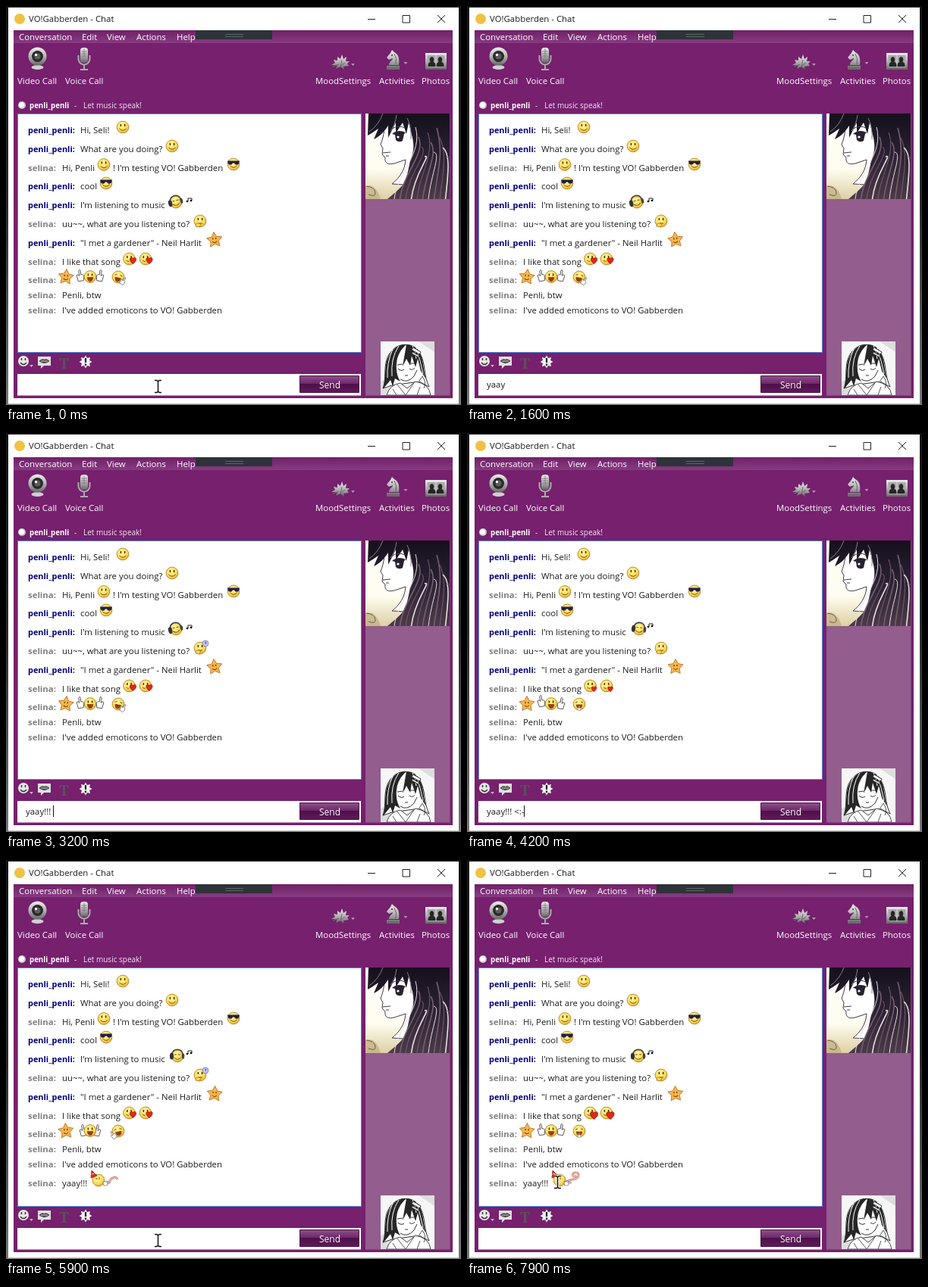
An HTML page for the animation above (8 s loop, 600 by 527 pixels).

```html
<!DOCTYPE html>
<html lang="en">
<head>
<meta charset="utf-8">
<title>Chat</title>
<style>
html, body { margin: 0; width: 100%; height: 100%; overflow: hidden; background: #333; }
svg { display: block; width: 600px; height: 527px; }
text { font: 11.4px "Open Sans", "Noto Sans", sans-serif; fill: #1c1c1c; white-space: pre; }
.w { fill: #fff; }
.s { font-size: 10px; fill: #f4e6f3; }
.name { font-size: 9.7px; font-weight: 700; fill: #fff; }
.me { font-weight: 700; fill: #808080; }
.pal { font-size: 10.9px; font-weight: 700; fill: #000080; }
.send { font-size: 12px; fill: #fff; }
.type { font: 700 20px "Noto Serif", serif; fill: #5b505c; }
</style>
</head>
<body>
<svg viewBox="0 0 600 527" xmlns="http://www.w3.org/2000/svg">
  <defs>
    <radialGradient id="skin" cx=".42" cy=".35" r=".7">
      <stop offset="0" stop-color="#fff8a8"/><stop offset=".6" stop-color="#fbdd5c"/><stop offset="1" stop-color="#e0a52c"/>
    </radialGradient>
    <linearGradient id="menu" x2="0" y2="1">
      <stop offset="0" stop-color="#702068"/><stop offset="1" stop-color="#873c81"/>
    </linearGradient>
    <linearGradient id="send" x2="0" y2="1">
      <stop offset="0" stop-color="#8d5189"/><stop offset=".48" stop-color="#6d2668"/>
      <stop offset=".5" stop-color="#4e0f4a"/><stop offset="1" stop-color="#611a5c"/>
    </linearGradient>
    <linearGradient id="metal" x2="0" y2="1">
      <stop offset="0" stop-color="#eee"/><stop offset=".5" stop-color="#b4b4b4"/><stop offset="1" stop-color="#666"/>
    </linearGradient>
    <linearGradient id="desk" x2="0" y2="1">
      <stop offset="0" stop-color="#151515"/><stop offset=".5" stop-color="#2c2a2c"/><stop offset="1" stop-color="#777"/>
    </linearGradient>
    <linearGradient id="paper" x2="0" y2="1">
      <stop offset="0" stop-color="#fffef8"/><stop offset=".65" stop-color="#fffdf0"/><stop offset="1" stop-color="#ddd0a4"/>
    </linearGradient>
    <linearGradient id="hair" x2="0" y2="1">
      <stop offset="0" stop-color="#15101c"/><stop offset=".5" stop-color="#2b2233"/><stop offset="1" stop-color="#4d3a48"/>
    </linearGradient>
    <clipPath id="pic1"><path d="M474 142h111v113h-111z"/></clipPath>
    <clipPath id="pic2"><path d="M494 443h71v71h-71z"/></clipPath>
  </defs>

  <!-- window -->
  <path fill="url(#desk)" d="M0 0h600v527H0z"/>
  <path fill="#fff" d="M3 2h594v523.500H3z"/>
  <path fill="#76206e" d="M10 32h579v486H10z"/>
  <path fill="url(#menu)" d="M10 32h579v17H10z"/>
  <circle cx="18" cy="17" r="7" fill="#f0c244"/>
  <path d="M477 17.500h10M523 12.500h9.500v9.500h-9.500zM569 12l10 10m0-10l-10 10" fill="none" stroke="#222"/>
  <path fill="#2d3338" d="M250 32h101v12H250z"/>
  <path d="M289 37.500h24M289 40.500h24" stroke="#5d666a"/>

  <!-- webcam -->
  <ellipse cx="41.500" cy="81" rx="8" ry="3" fill="#d0d0d0"/>
  <circle cx="41.500" cy="66.500" r="12" fill="url(#metal)"/>
  <circle cx="41.500" cy="66.500" r="7.500" fill="#2a2a2a"/><circle cx="41.500" cy="66.500" r="4" fill="#5c5c5c"/>
  <circle cx="39.500" cy="64.500" r="1.700" fill="#fff"/>
  <!-- microphone -->
  <path d="M95.500 65v5a7.500 7.500 0 0 0 15 0v-5M103 78v5m-5 1h10" fill="none" stroke="#aaa" stroke-width="2"/>
  <rect x="98" y="55" width="10" height="20" rx="4" fill="url(#metal)"/>
  <path d="M99 60h8m-8 3h8m-8 3h8M103 56v12" stroke="#777" stroke-width=".8"/>
  <!-- leaf, knight, photos -->
  <path fill="url(#metal)" d="M443 64l2 6 4-3-1 6 5 0-3 3 2 3-7 1 1 4-5-4-6 3 2-5-8 0 5-3-2-4 5 1 0-5 4 3z"/>
  <path d="M431 80l8-3M443 71l-2 10m6-6l-6 4" fill="none" stroke="#6b6b6b"/>
  <path fill="url(#metal)" d="M505 78c0-5 5-6 5-9l-5 2-3-3 5-6 2-4 3 3c6 3 7 9 6 17zM502 79h17v5h-17z"/>
  <path d="M512 63q4 6 2 14M503 81.500h15" fill="none" stroke="#666"/><circle cx="509" cy="65" r="1" fill="#333"/>
  <path fill="#c9c9c9" d="M455 76h5l-2.500 3zM524.500 74h5l-2.500 3z" opacity=".7"/>
  <path fill="url(#metal)" d="M553 62h28v22h-28z"/><path fill="#a9a9a9" d="M555.500 65h23v16h-23z"/><path d="M567 65v16" stroke="#ddd"/>
  <path fill="#262626" d="M556.500 80c0-5 1-5 3-6-4-9 8-9 4 0 2 1 3 1 3 6zm11 0c0-5 1-5 3-6-4-9 8-9 4 0 2 1 3 1 3 6z"/>

  <circle cx="21" cy="131" r="5" fill="#ccc"/><circle cx="20.500" cy="130.500" r="3.500" fill="#fff"/>

  <!-- panels -->
  <path fill="#fff" stroke="#4a86d8" d="M15.500 142.500h453v315h-453z"/>
  <path fill="#fff" d="M15 486h453v28.500H15z"/>
  <path fill="url(#send)" stroke="#4b1248" d="M387.500 488.500h78v22h-78z"/>
  <path fill="#935d8e" d="M474 142h111.500v372.500h-111.500z"/>

  <!-- portrait, dark hair -->
  <g clip-path="url(#pic1)">
    <path fill="url(#paper)" d="M474 142h111v113h-111z"/>
    <path fill="#b9a678" opacity=".6" d="M474 238q14-4 20 17h-20z"/>
    <path d="M475 238q11 1 12 8t-9 3" fill="none" stroke="#6d5d4a"/>
    <path fill="#fff" stroke="#42394a" d="M500 148c-1 14-1 22-6 35l3 5-1 8 4 4c-1 8 4 10 12 8l15-5c-1 14-8 24-18 32l34 2 16-60-30-40z"/>
    <path fill="url(#hair)" d="M478 142h107v113h-82c9-8 18-14 23-23 4-10 5-20 8-31 4-9 4-17 2-27l-5-20-3 15-5-15-9 14 0-14-10 20 0-16c-6 9-11 14-19 18l6-14c-6 4-10 7-14 9z"/>
    <path d="M497 142q-6 16-18 24m36-22q-2 14-8 21m22-17q6 12 5 28" fill="none" stroke="#887d8d"/>
    <g id="strands" fill="none"></g>
    <path fill="#2a2130" d="M509 169q8-7 18-2l-2 2-2 9q-5 3-9-1l-1-7z"/><circle cx="517" cy="173" r="1.600" fill="#fff"/>
    <path d="M509 162q9-5 17-1M497 194l10-1m-6 5h4" fill="none" stroke="#4a3a48"/>
  </g>
  <!-- portrait, grey sketch -->
  <g clip-path="url(#pic2)">
    <path fill="#f6f6f6" d="M494 443h71v71h-71z"/>
    <path fill="#ddd" d="M544 443h21v14zM494 496l14-6 10 24h-24z"/>
    <path fill="#fff" stroke="#333" d="M497 505c6-16-2-35 12-50 12-13 31-8 37 4 8 14 4 28 12 44l-13-7-36 5z"/>
    <path fill="#262626" d="M497 506c6-18-1-35 12-50 5-6 12-9 19-9-8 7-12 15-13 25-1 10 1 17 5 24l-7-4-3 10-3-8z"/>
    <path fill="#262626" d="M528 447c8 0 14 4 18 12 5 10 4 22 8 34l-7-11-4-16-3 11-5-15-2 13-5-9-5 10z"/>
    <path d="M510 453q-8 18-7 38m15-42q-11 16-9 40m32-37q6 18 9 34m-14-37q4 8 5 17" fill="none" stroke="#fff"/>
    <path fill="#fff" stroke="#333" d="M537 451l10 6-2 3-10-6zM536 457l9 5-1 2-9-5z"/>
    <path d="M517 479q4 4 8 1m7-1q4 3 7-1M516 474l7-1m10-1l6 0M526 488h4M520 493q9 6 18-4l4-8" fill="none" stroke="#333"/>
    <path fill="#fff" stroke="#444" d="M502 514q4-14 18-16l9 7 11-9q18 3 20 18z"/>
    <path d="M516 500l11 14 11-16m-28 8l5 8m31-11l-4 11m9-9q4-8-2-16l-4 6" fill="none" stroke="#555"/>
  </g>

  <!-- input tools -->
  <circle cx="23" cy="469" r="7" fill="#e6e6e6"/>
  <path d="M19 471q4 5 8 0M20.500 465v3m5-3v3" fill="none" stroke="#333" stroke-width="1.500"/>
  <path fill="#bbb" d="M31 474h5l-2.500 3z"/>
  <path fill="#e0e0e0" d="M42 463h17v12h-9l-4 4v-4h-4z"/>
  <path fill="#444" d="M43.500 469q4-4 7-2 3-2 7 2-7 6-14 0z"/><path d="M46 469h9" stroke="#ddd"/>
  <text x="70" y="478.500" class="type">T</text>
  <path id="burst" fill="#f2f2f2"/>
  <path d="M105 465v6m0 1.500v2.500" stroke="#222" stroke-width="2.200"/>

  <g id="words"></g>
  <g id="live"></g>
  <text id="draft" x="26" y="504"></text>
  <path id="caret" stroke="#111" fill="none"/>
  <g id="beam" fill="none">
    <path d="M-4.500-8h3l1.500 1.500 1.500-1.500h3M0-6.500v13M-4.500 8h3l1.500-1.500 1.500 1.500h3" stroke="#fff" stroke-width="3.500"/>
    <path d="M-4.500-8h3l1.500 1.500 1.500-1.500h3M0-6.500v13M-4.500 8h3l1.500-1.500 1.500 1.500h3" stroke="#111" stroke-width="1.500"/>
  </g>
</svg>
<script>
const LOOP = 8000, STEP = 100;
const $ = id => document.getElementById(id);
const label = (x, y, s, c = '') => `<text x="${x}" y="${y}" class="${c}">${s}</text>`;
const line = (d, c = '#7a4a10', w = 1) => `<path d="${d}" fill="none" stroke="${c}" stroke-width="${w}"/>`;
const shape = (d, c, edge = 'none') => `<path d="${d}" fill="${c}" stroke="${edge}" stroke-width=".8"/>`;
const at = (x, y, s, turn = 0, kx = 1, ky = Math.abs(kx)) =>
  `<g transform="translate(${x} ${y}) rotate(${turn}) scale(${kx} ${ky})">${s}</g>`;

function spikes(n, outer, inner, cx = 0, cy = 0) {
  const pts = Array.from({ length: 2 * n }, (_, i) => {
    const r = i % 2 ? inner : outer, a = Math.PI * (i / n - .5);
    return (cx + r * Math.cos(a)).toFixed(1) + ' ' + (cy + r * Math.sin(a)).toFixed(1);
  });
  return 'M' + pts.join('L') + 'z';
}

// Fixed text
const YOU = 'penli_penli', ME = 'selina';
const chat = [
  [1, 168, 'Hi, Seli!'], [1, 193, 'What are you doing?'], [0, 218, 'Hi, Penli'],
  [1, 242, 'cool'], [1, 267, "I'm listening to music"],
  [0, 292, 'uu~~, what are you listening to?'], [1, 317, '"I met a gardener" - Neil Harlit'],
  [0, 342, 'I like that song'], [0, 366, ''], [0, 386, 'Penli, btw'],
  [0, 406, "I've added emoticons to VO! Gabberden"]
];
const say = ([pal, y, s]) =>
  label(29, y, (pal ? YOU : ME) + ':', pal ? 'pal' : 'me') + label(pal ? 98 : 74, y, s);
const menus = [[17, 'Conversation'], [100, 'Edit'], [133, 'View'], [172, 'Actions'], [225, 'Help']];
const tools = [[15, 'Video Call'], [78, 'Voice Call'], [408, 'MoodSettings'], [492, 'Activities'], [548, 'Photos']];
$('words').innerHTML = label(30, 21, 'VO!Gabberden - Chat') +
  menus.map(([x, s]) => label(x, 45, s, 'w')).join('') +
  tools.map(([x, s]) => label(x, 102.5, s, 'w')).join('') +
  label(31, 134.5, YOU, 'name') + label(90, 134.5, '-', 's') + label(102, 134.5, 'Let music speak!', 's') +
  label(413, 504.5, 'Send', 'send') + chat.map(say).join('') +
  label(141, 218, "! I'm testing VO! Gabberden");
$('burst').setAttribute('d', spikes(8, 8.5, 5.5, 105, 470));
$('strands').innerHTML = Array.from({ length: 11 }, (_, i) => {
  const x = 540 + i * 4, end = 512 + i * 7.5;
  return line(`M${x} ${160 + i * 13 % 45}C${x + 10} 195 ${end + 4} 220 ${end} 255`, i % 3 ? '#75606f' : '#e9dfe2', 1 + i % 2 * .6);
}).join('');

// Emoticons
const eyes = line('M-2.600-4v3M2.600-4v3', '#4a2a05', 1.5);
const smile = line('M-4.500 2q4.500 4.500 9 0');
const laugh = shape('M-3.800 1h7.600q-.8 5-3.800 5t-3.800-5z', '#9c3a1a', '#7a4a10');
const ball = s => `<circle r="7.900" fill="url(#skin)" stroke="#b07a1c" stroke-width=".8"/>` + s;
const happy = ball(eyes + smile);
const cool = ball(smile + shape('M-8-4.500h16l-1 4q-4 3-6-1h-2q-2 4-6 1z', '#20204a'));
const star = shape(spikes(5, 10.5, 5.5), '#f7b84c', '#b5651a') +
  at(0, 0, eyes, 0, .75) + line('M-3 2q3 3 6 0', '#7a3a08');
const glove = shape('M-3 5l-1-7q2-2 3 1l0-6q2-2 2 0l0 5q3-1 3 3l-1 4z', '#fff', '#555');
const heart = shape('M0 5C-8-1-4-6 0-3 4-6 8-1 0 5z', '#e02818', '#99150c');

function tongue(ms) {
  const p = ms % 2700;
  if (p < 2000 || p >= 2400) return happy;
  const r = p >= 2100 && p < 2300 ? 3.8 : 2.2;
  return ball(eyes + `<circle cy="2.500" r="${r}" fill="#df3020" stroke="#8c1d10" stroke-width=".6"/>`);
}

function music(i) {
  const dx = [-2, -1, 1, 0, 2, 1, 0, 0][i], tilt = [-14, -8, 6, 0, 14, 8, 0, 0][i];
  const phones = line('M-7-2c0-9 14-9 14 0', '#444', 1.6) +
    '<ellipse cx="-7.500" cy="0" rx="2.600" ry="4.500" fill="#333"/><ellipse cx="7.500" cy="0" rx="1.800" ry="3.800" fill="#444"/>';
  const ny = [257, 256, 255, 255, 255, 255, 254, 255][i];
  return at(226 + dx, 259, ball(line('M-4-2h3m2 0h3') + smile + phones), tilt) +
    at(242, ny, line('M-2 1v-4h5v3', '#222') + '<circle cx="-3" cy="1" r="1.300"/><circle cx="2" cy="0" r="1.300"/>');
}

function think(ms) {
  const idea = ms % 2900 >= 100 && ms % 2900 < 500;
  return ball(eyes + line('M-2 3h5') + shape('M-6 7q0-5 4-4l3 1-2 4z', '#f8d860', '#a86c12')) +
    (idea ? '<circle cx="7" cy="-6" r="4" fill="#c9c6f2" stroke="#6a67b8" stroke-width=".7"/>' + line('M6-7q2-2 2 0l-1 2', '#4744a0', .9) : '');
}

function love(i) {
  const y = [2, 3, 4, 2, 5, 5, 4, 3][i], k = [.9, .8, .75, .9, .7, .75, .85, 1.1][i];
  return ball(eyes + line('M-4 2q2 2 4 1') + at(5, y, heart, 0, k));
}

function cheer(i) {
  const pose = [0, 0, 1, 2, 1, 0, 0, 0][i];
  const [gap, left, right] = [[13, 0, 0], [13, -2, 1], [9, 1, 1]][pose];
  return at(-gap, left, glove, -8, 1.15) + at(gap, right, glove, 8, -1.15) + ball(eyes + laugh);
}

function giggle(i) {
  const side = [1, 1, 0, -1, -1, -1, -1, 0][i];
  return at(148 - (i === 4 ? 3 : 0), 358, ball(line('M-5-2l3-1m4 0l3 1') + laugh), side * 12) +
    at(148 + side * 6, 364, glove, side * 35, side ? .8 : .5);
}

function party(i) {
  const out = i > 1 && i < 6;
  const horn = out ? 'M6 3q7 3 10-4 7-6 9 0' : 'M6 3l10-4c13-1 10-11 4-9-5 2-2 7 2 4';
  return ball(line('M-4-2h3m2-2v3')) +
    at(-6, -7, shape('M-4 4L-3-6 4 1z', '#dd2f2b', '#8f1c1c') + line('M-3.500-1l4-1', '#ffe060')) +
    line(horn, '#b9564c', 2.6) + line(horn, '#f8d8cc', 1.2) +
    at(10, 4, glove, 80, .75);
}

function drawLive(ms) {
  const i = ms / STEP % 8;
  const sway = [-6, -3, 0, 4, 6, 4, 0, -3][i];
  const kiss = love(i);
  let s = at(154, 160, happy) + at(219, 185, tongue(ms)) + at(129, 209.5, tongue(ms)) +
    at(300, 209, cool) + at(132, 234, cool) + music(i) + at(256, 284, think(ms)) +
    at(275, 309, star, sway) + at(162.5, 334, kiss) + at(184, 334, kiss) +
    at(79, 358, star, -sway) + at(111, 357.5, cheer(i)) + giggle(i);
  if (ms >= 5600) s += say([0, 431, 'yaay!!!']) + at(122, 423, party(i));
  else if (ms >= 4700) s += say([0, 426, 'yaay!!! &lt;:-P']);
  $('live').innerHTML = s;
}

// Times of each key press in the input line
const PHRASE = 'yaay!!! <:-P', SENT = 4700;
const keys = [500, 600, 700, 900, 2000, 2800, 2900, 3100, 3500, 3800, 4100, 4300];

function drawInput(ms) {
  const sent = ms >= SENT, n = sent ? 0 : keys.filter(k => k <= ms).length;
  const last = sent ? SENT : n ? keys[n - 1] : 200;
  $('draft').textContent = PHRASE.slice(0, n);
  const x = n ? Math.round(26 + $('draft').getComputedTextLength()) + .5 : 23.5;
  $('caret').setAttribute('d', `M${x} 492v15`);
  const on = ms >= 200 && ms < 5200 && (ms - last) % 1000 < 500;
  $('caret').style.visibility = on ? 'visible' : 'hidden';
}

function drawBeam(ms) {
  const p = Math.min(1, Math.max(0, (ms - 7300) / 500)), e = p * p * (3 - 2 * p);
  $('beam').setAttribute('transform', `translate(${200.5 - 81 * e} ${502.5 - 77 * e})`);
  $('beam').style.visibility = ms < keys[0] || ms >= 4800 ? 'visible' : 'hidden';
}

let shown = -1;
const start = performance.now();
function tick() {
  const ms = Math.floor((performance.now() - start) % LOOP / STEP) * STEP;
  if (ms !== shown) {
    shown = ms;
    drawLive(ms);
    drawInput(ms);
    drawBeam(ms);
  }
  requestAnimationFrame(tick);
}
tick();
</script>
</body>
</html>
```
